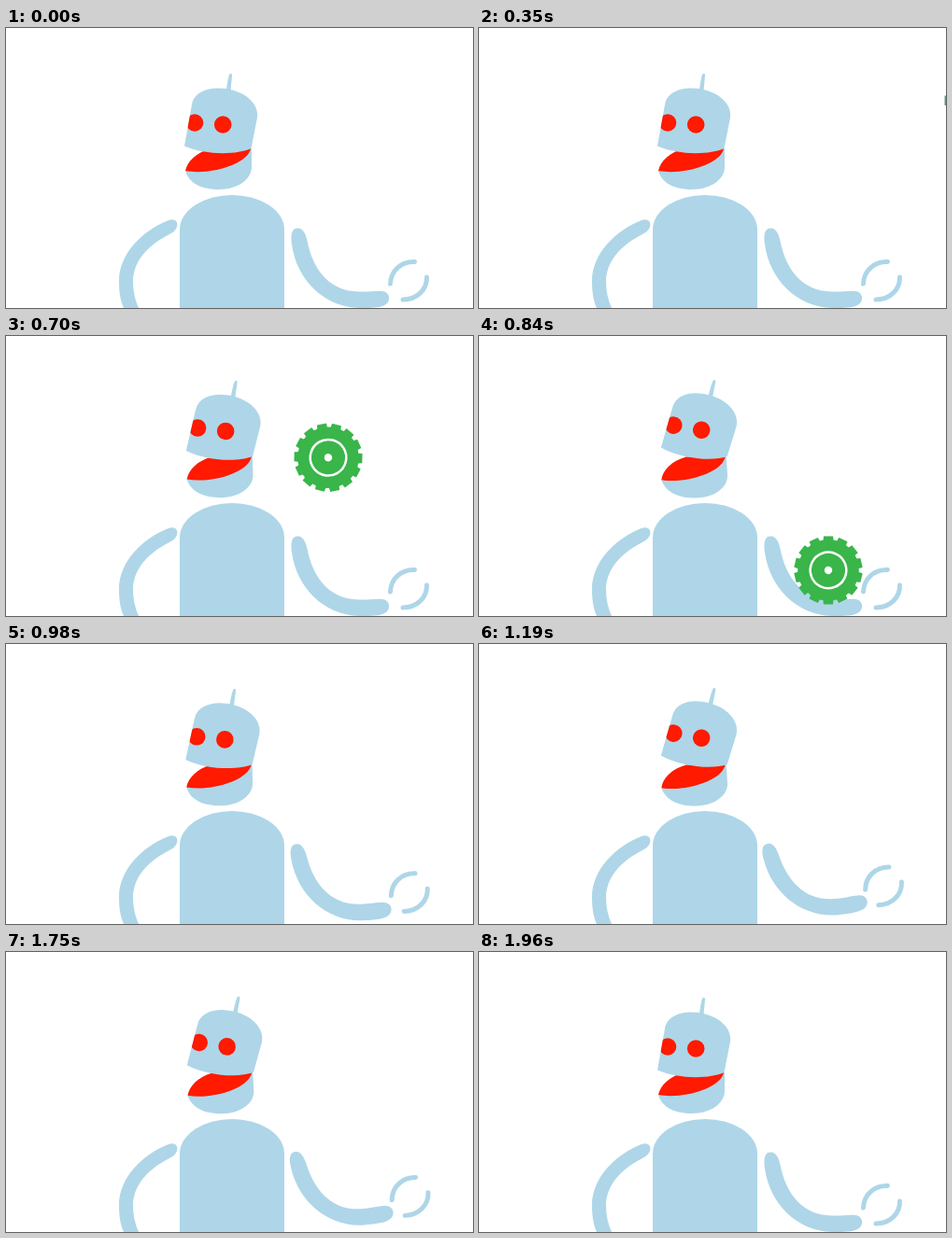
An HTML page that plays this animation: 500 by 300 pixels, repeating every 3.22 s.

```html
<!DOCTYPE html>
<html lang="en">
<head>
<meta charset="utf-8">
<title>Robot and gear</title>
<style>
  html, body { margin: 0; width: 100%; height: 100%; overflow: hidden; background: #fff; }
  svg { display: block; width: 100vw; height: 100vh; }
  .metal { fill: #aed6e8; }
  .red { fill: #ff1a00; }
  .claw { fill: none; stroke: #aed6e8; stroke-width: 5; stroke-linecap: round; }
</style>
</head>
<body>
<svg viewBox="0 0 500 300">
  <defs>
    <path id="skull" d="M191 126.5L199 82C202 66 222 62 240 66C259 70 271 83 269 96L262.5 129C247 136 214 136.5 191 126.5Z"/>
    <clipPath id="face"><use href="#skull"/></clipPath>
  </defs>

  <path class="metal" d="M186 300V216A56 37 0 0 1 298 216V300Z"/>
  <path class="metal" d="M126 300C122 291 121 281 121 271C121 242 146 217 174 206C180 203.500 185 207 183 213C181.500 219 174 221 168 225C149 236 136 252 136 272C136 282 138 291 142 300Z"/>

  <path id="arm" class="metal" d="M312 214.500C318 214 321 221 322.500 228C328 256 344 282 378 282.500C388 283 396 281 403 282C412 283 413 295 403 298C397 300 388 300 378 300C340 299 311 269 306 232C305 224 304.500 215 312 214.500Z"/>
  <g id="hand" class="claw">
    <path d="M411.500 274C412 260 423 250 437.500 250.500"/>
    <path d="M450.500 267C451 280 440 291 425 291"/>
  </g>

  <g id="jaw">
    <path class="metal" d="M192 153C196 167 210 173 228 173C248 173 263 162 263 149V129L250 132Z"/>
    <path class="red" d="M192 153C194 143 204 133 220 129L262 129C259 146 218 158 192 153Z"/>
  </g>
  <g id="head">
    <path class="metal" d="M235.500 68C237 60 237.500 54 239 50C240 48 242.500 48.500 242 51C241.500 57 241 61 240.500 68Z"/>
    <use href="#skull" class="metal"/>
    <g class="red" clip-path="url(#face)">
      <circle cx="202" cy="101.500" r="9.300"/>
      <circle cx="232.200" cy="103.500" r="9.300"/>
    </g>
  </g>

  <g id="gear">
    <path id="teeth"/>
    <circle r="19.300" fill="none" stroke="#fff" stroke-width="2.500"/>
    <circle r="4.200" fill="#fff"/>
  </g>
</svg>
<script>
const LOOP = 3220, START = 350, STEP = 70, LAST = 23, HIT = 3, TEETH = 14;
const NOD = [[3, 0], [7, 1], [9.5, 0.2], [12, 1], [14.5, 0.2], [19, 1], [23, 0]];
const LIFT = [[7, 0], [16, 1.17], [23, 0]];
const $ = id => document.getElementById(id);
const [arm, hand, jaw, head, gear, teeth] =
  ['arm', 'hand', 'jaw', 'head', 'gear', 'teeth'].map($);

function gearPath() {
  const pitch = 2 * Math.PI / TEETH;
  const points = [];
  for (let i = 0; i < TEETH; i++) {
    for (const [r, offset] of [[32.8, -0.37], [36.8, -0.31], [36.8, 0.31], [32.8, 0.37]]) {
      const a = (i + offset) * pitch - Math.PI / 2;
      points.push((r * Math.cos(a)).toFixed(2) + ' ' + (r * Math.sin(a)).toFixed(2));
    }
  }
  return 'M' + points.join('L') + 'Z';
}

// Linear interpolation through [step, value] keys.
function track(keys, k) {
  if (k <= keys[0][0]) return keys[0][1];
  for (let i = 1; i < keys.length; i++) {
    const [a, va] = keys[i - 1], [b, vb] = keys[i];
    if (k <= b) return va + (vb - va) * (k - a) / (b - a);
  }
  return keys[keys.length - 1][1];
}

const move = (el, value) => el.setAttribute('transform', value);

function drawGear(k) {
  const n = k - HIT;
  const falling = n > 0;
  const x = 316 + (falling ? 14.5 : -73) * n;
  const y = falling ? 90 + 10.06 * n * n : 90 - 12 * (1 - (1 + n / 3) ** 2);
  const spin = 3 + (falling ? 5.7 : -12) * n;
  gear.style.display = k < 0 || k > 8 ? 'none' : '';
  teeth.setAttribute('fill', k === 0 ? '#4b9a84' : '#39b54a');
  move(gear, `translate(${x} ${y}) rotate(${spin})`);
}

function draw(ms) {
  const t = ms % LOOP;
  const k = Math.min(LAST, Math.floor((t - START) / STEP));
  const nod = track(NOD, k), lift = track(LIFT, k);
  move(head, `rotate(${5.8 * nod} 263 161)`);
  move(jaw, `matrix(1 ${-0.02 * nod} ${0.07 * nod} 1 ${-7.4 * nod} ${5 * nod})`);
  move(arm, `rotate(${-11.4 * lift} 306 239)`);
  move(hand, `translate(${3.2 * lift} ${-17.5 * lift}) rotate(${-3 * lift} 431 271)`);
  drawGear(k);
}

teeth.setAttribute('d', gearPath());
const begin = performance.now();
function tick() {
  draw(performance.now() - begin);
  requestAnimationFrame(tick);
}
tick();
</script>
</body>
</html>
```
